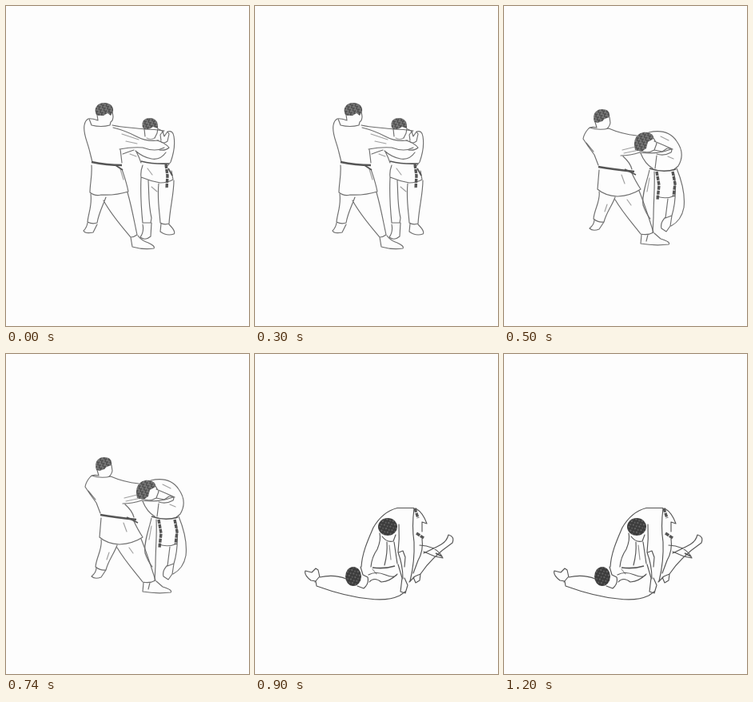
Write an HTML page without scripts that moves like this. It is 304 px wide and 400 px high and loops after 1.4 s.

```html
<!DOCTYPE html>
<html lang="en">
<head>
<meta charset="utf-8">
<title>Judo throw</title>
<style>
  html, body { margin: 0; width: 100%; height: 100%; overflow: hidden; background: #fdfdfd; }
  svg { display: block; width: 100%; height: 100%; }
  .pose { opacity: 0; animation: 1400ms step-end infinite; filter: url(#ink); }
  #grip { animation-name: grip; }
  #pull { animation-name: pull; }
  #floor { animation-name: floor; }
  /* cuts at 500 ms and 900 ms */
  @keyframes grip { 0% { opacity: 1 } 35.714% { opacity: 0 } 100% { opacity: 0 } }
  @keyframes pull { 0% { opacity: 0 } 35.714% { opacity: 1 } 64.286% { opacity: 0 } 100% { opacity: 0 } }
  @keyframes floor { 0% { opacity: 0 } 64.286% { opacity: 1 } 100% { opacity: 1 } }
  .line { fill: none; stroke: #6e6e6e; stroke-width: 1.15; stroke-linecap: round; stroke-linejoin: round; }
  #floor .line { stroke: #555; }
  .soft { opacity: .65; }
  .hair { fill: url(#strands); }
  #floor .hair { fill: url(#dense); }
  .belt { fill: none; stroke: #555; stroke-width: 2.6; stroke-linejoin: round; }
  .tail { stroke-width: 3.4; stroke-dasharray: 5 1; }
  .thin { stroke-width: 1.7; }
</style>
</head>
<body>
<svg viewBox="0 0 304 400">
  <defs>
    <filter id="ink" filterUnits="userSpaceOnUse" x="0" y="0" width="304" height="400">
      <feGaussianBlur stdDeviation=".4"/>
    </filter>
    <pattern id="strands" width="5" height="4" patternUnits="userSpaceOnUse" patternTransform="rotate(-24)">
      <rect width="5" height="4" fill="#505050"/>
      <path d="M0 1h3M2 3h2" stroke="#a0a0a0"/>
    </pattern>
    <pattern id="dense" width="6" height="5" patternUnits="userSpaceOnUse" patternTransform="rotate(-24)">
      <rect width="6" height="5" fill="#3c3c3c"/>
      <path d="M0 1h2M3 4h1.5" stroke="#888"/>
    </pattern>
  </defs>

  <g id="grip" class="pose">
    <!-- thrower -->
    <path class="hair" d="M113 136C109 127 115 121 123 121C131 121 135 126 134 132L131 137L127 134L122 137L116 137Z"/>
    <path class="line" d="M114 136L115 143M133 132L134 138Q134 143 131 145L130 149
      M115 143Q106 140 103 141Q99 143 98 149M104 141L107 149Q119 152 130 149
      M98 149C96 160 102 169 105 183L108 195
      M133 149C146 152 160 152 173 154Q186 154 198 156
      M134 152Q150 156 163 163T191 168
      M142 179Q158 176 171 177Q187 183 198 177
      M146 185Q154 182 160 180M143 179L145 196
      M107 199C108 212 105 222 105 233Q111 238 119 236Q137 237 153 232C151 221 148 213 145 204
      M106 235C108 249 103 259 102 270Q108 273 114 271C116 259 121 250 125 239
      M122 243C131 260 145 276 156 289Q160 289 164 286C160 267 157 250 152 233
      M102 271Q101 277 97 281Q99 285 109 283L114 273
      M156 289L158 301Q172 305 185 303Q187 300 178 296Q169 293 165 287"/>
    <path class="line soft" d="M145 160L166 167M150 169L164 172M143 204L147 217M155 185L163 188"/>
    <path class="belt" d="M107 195Q126 199 145 199"/>
    <path class="belt thin" d="M137 199L146 205"/>
    <!-- partner -->
    <path class="hair" d="M171 152C169 144 173 140 180 140C187 140 191 145 190 153L184 151L179 154L173 154Z"/>
    <path class="line" d="M173 154L174 163M190 153L189 159L186 165
      M191 154L197 157M202 157Q209 155 210 163C212 175 210 184 206 195L202 200
      M194 168L193 161L196 157L198 163L202 157L204 160L202 169Q197 173 193 169
      M189 168Q199 171 204 177Q200 181 192 180
      M162 181Q171 189 182 191T200 183
      M163 182Q167 190 169 196
      M171 199Q168 207 169 214Q181 219 193 221Q202 221 209 217L207 206
      M178 218C179 234 178 248 182 265L181 271L171 271C169 251 168 234 169 214
      M191 222C189 241 192 256 193 271Q198 274 204 272C205 252 210 236 210 218
      M171 273Q173 282 168 289Q174 294 181 288L182 271
      M194 272L193 282Q201 288 210 285Q213 282 204 273"/>
    <path class="line soft" d="M177 203L183 211M182 226L189 232M176 165Q181 168 186 165"/>
    <path class="belt thin" d="M169 194Q185 198 204 197"/>
    <path class="belt tail" d="M200 198L202 212L201 228"/>
    <path class="belt thin" d="M203 203L208 212"/>
  </g>

  <g id="pull" class="pose">
    <!-- thrower -->
    <path class="hair" d="M113 145C110 135 115 129 123 129C130 129 133 133 132 139L126 141L123 144L117 146Z"/>
    <path class="line" d="M114 145L116 152M132 139L133 146Q132 151 129 153
      M116 152Q108 150 105 154Q100 160 99 166L105 175L113 186L118 199
      M107 152Q119 156 131 153Q147 160 166 162
      M103 171L112 182M146 187Q158 187 170 183Q190 186 209 179
      M149 188Q158 196 160 204
      M119 205L117 229Q126 237 142 238Q159 237 171 229Q164 218 160 209
      M119 232C121 243 113 254 112 266Q118 271 125 270C128 258 135 250 139 239
      M139 242C149 259 161 272 171 285Q180 287 187 283C181 264 176 248 169 231
      M113 267Q113 273 107 278Q111 282 119 279L125 270
      M172 286L171 297Q189 300 206 298Q209 295 196 291L188 284M180 286L178 294"/>
    <path class="line soft" d="M148 180L164 176M150 184L169 180M147 211L151 222M154 242L159 249M129 248L126 257"/>
    <path class="belt" d="M118 201Q135 204 163 207"/>
    <path class="belt thin" d="M151 204L165 211"/>
    <!-- partner -->
    <path class="hair" d="M164 180C161 168 165 160 174 158C181 157 188 160 187 166L180 170L178 178L172 182Z"/>
    <path class="line" d="M181 158C199 154 210 160 216 169C224 180 224 190 218 200L212 205
      M187 165L191 172L188 180Q180 185 171 181
      M188 180L198 182L204 178Q212 177 209 183Q200 188 191 185
      M188 169Q200 174 211 179M171 184Q176 197 186 203M191 187L189 203
      M182 205C179 219 172 235 174 249Q178 260 183 266M188 207C189 225 187 245 187 264L186 283
      M216 203C223 220 227 235 225 252Q222 268 209 275
      M213 211C216 234 214 249 210 262L202 265L205 241
      M202 264Q195 271 197 278L203 282L208 275L210 262
      M191 238Q203 242 214 237"/>
    <path class="line soft" d="M196 163L206 168M205 188L212 191M182 215L179 232"/>
    <path class="belt thin" d="M182 203Q199 209 215 204"/>
    <path class="belt tail" d="M191 207L194 224L192 242M211 207L214 222L212 238"/>
  </g>

  <g id="floor" class="pose">
    <!-- thrower bending down, cut flat along the back -->
    <path class="line" d="M178 192.5H199M178 192.5C164 196 155 205 148 217C142 231 134 248 133 266
      M156 224Q158 232 153 244Q146 254 145 266
      M176 226L173 234Q165 236 159 228M165 235Q166 249 162 264M174 235L178 262
      M180 213Q181 231 179 248Q185 264 185 281
      M199 193Q196 216 199 235Q200 259 194 284
      M180 248L185 246L188 254L187 266
      M201 193Q210 198 215 212L209 210L209 222
      M209 231Q211 246 204 258L198 274"/>
    <ellipse class="hair" cx="166" cy="216" rx="12" ry="11"/>
    <path class="belt tail" d="M200 193L204 205M202 224L211 230"/>
    <!-- partner on the mat -->
    <ellipse class="hair" cx="123" cy="278" rx="10" ry="12"/>
    <path class="line" d="M114 281Q99 275 81 279L79 270L76 268L71 273L63 271Q61 276 70 283L76 284L77 290C99 298 120 304 143 306Q166 309 181 302L188 297
      M80 279L75 285M132 266L135 276L141 279Q143 287 136 293L128 290
      M142 276Q151 271 163 276T178 275
      M143 285Q149 278 158 285Q169 284 177 276
      M179 263L184 280L182 297L188 299L191 289L187 280
      M193 285L200 278L207 275L206 283L201 286L198 279
      M207 275C217 260 231 247 247 236Q250 228 242 226Q240 234 233 238T211 249
      M206 239Q224 240 232 250L235 255L225 253L211 247"/>
    <path class="belt thin" d="M147 267Q162 269 175 265M226 249L234 253"/>
    <path class="line soft" d="M168 239L170 257M147 269L152 275"/>
  </g>
</svg>
</body>
</html>
```
